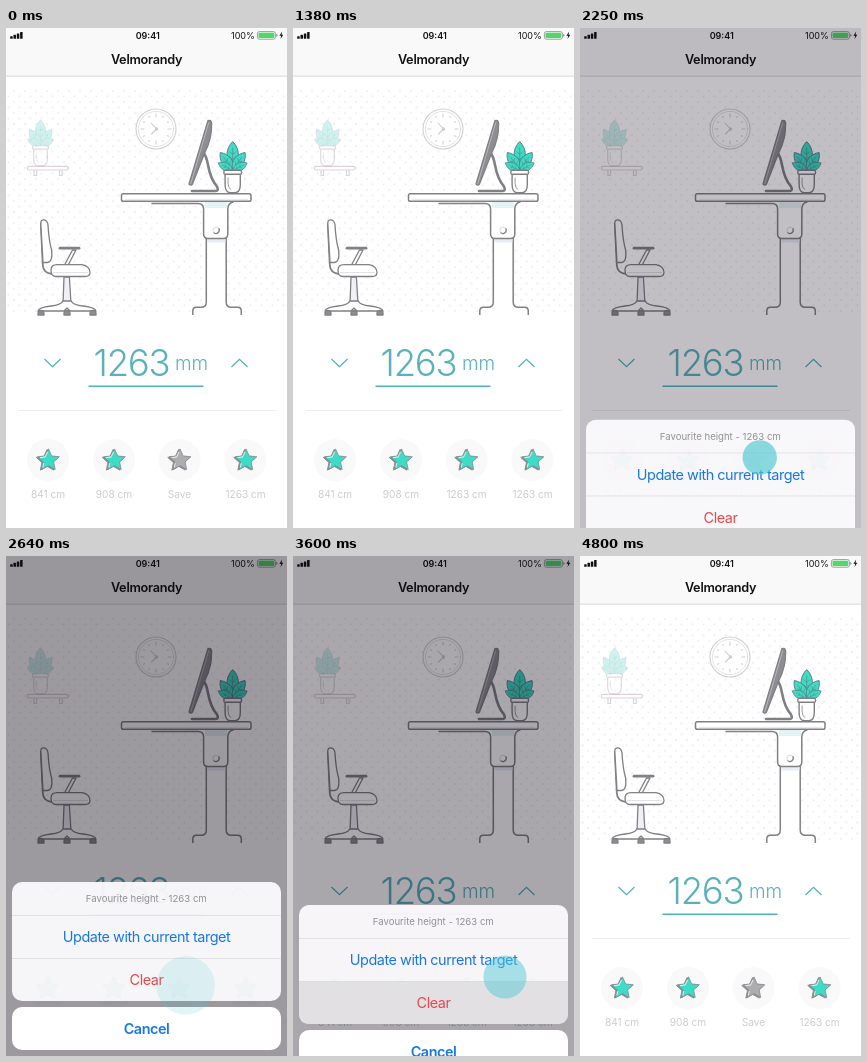
These frames come from a looping animation (281x500 px, 5220 ms). An HTML page:

```html
<!DOCTYPE html>
<html lang="en">
<head>
<meta charset="utf-8">
<title>Standing desk</title>
<style>
  html, body { margin: 0; width: 100%; height: 100%; overflow: hidden; background: #fff; }
  svg { display: block; width: 100vw; height: 100vh; }
  text { font-family: Inter, "Liberation Sans", sans-serif; }
</style>
</head>
<body>
<svg id="stage" viewBox="0 0 281 500"></svg>
<script>
const LOOP = 5220;
const INK = '#808085', TEAL = '#3cdcc6', BLUE = '#1877e6';
const SLOTS = [42, 108, 173.5, 239.5];
const LABELS = ['841 cm', '908 cm', 'Save', '1263 cm'];

const path = (d, attrs = '') => `<path d="${d}" ${attrs}/>`;
const rect = (x, y, w, h, attrs = '') =>
  `<rect x="${x}" y="${y}" width="${w}" height="${h}" ${attrs}/>`;
const circle = (x, y, r, attrs = '') => `<circle cx="${x}" cy="${y}" r="${r}" ${attrs}/>`;
const text = (x, y, size, fill, str, attrs = 'text-anchor="middle"') =>
  `<text x="${x}" y="${y}" font-size="${size}" fill="${fill}" ${attrs}>${str}</text>`;
const group = (attrs, ...parts) => `<g ${attrs}>${parts.join('')}</g>`;

function statusBar() {
  const bars = [0, 1, 2, 3].map(i =>
    rect(4.2 + i * 3.3, 8.2 - i * 1.4, 2.5, 2.6 + i * 1.4, 'rx=".5" fill="#111"'));
  return rect(0, 0, 281, 48, 'fill="#f9f9f9"') + rect(0, 47.8, 281, .6, 'fill="#bdbdbd"') +
    bars.join('') +
    text(141.7, 10.8, 9, '#111', '09:41', 'text-anchor="middle" font-weight="600"') +
    text(225, 10.8, 9, '#111', '100%', '') +
    rect(251.4, 3.6, 18, 7.6, 'rx="2" fill="none" stroke="#777" stroke-width=".7"') +
    rect(252.5, 4.7, 15.8, 5.4, 'rx="1.1" fill="#4cd964"') +
    path('M270.3 6v2.8q1.2-.4 1.2-1.4t-1.2-1.4z', 'fill="#777"') +
    path('M276.2 3.6l-2.8 4.2h1.8l-.7 3.3 2.8-4.3h-1.8z', 'fill="#111"') +
    text(140.6, 35.5, 12.7, '#111', 'Velmorandy',
      'text-anchor="middle" font-weight="600" letter-spacing="-.25"');
}

function backdrop() {
  return `<defs><pattern id="dots" width="11" height="11" patternUnits="userSpaceOnUse">
    <g fill="#f3f2f4"><circle cx="2.5" cy="2.5" r="1.2"/><circle cx="8" cy="8" r="1.2"/></g>
    </pattern></defs>` + rect(0, 62, 281, 225, 'fill="url(#dots)"');
}

function leaf(angle, y, size) {
  return group(`transform="translate(0 ${y}) rotate(${angle}) scale(${size})"`,
    path('M0 0C-8-6-7-17 0-24C7-17 8-6 0 0Z', `fill="${TEAL}"`),
    path('M0 0V-18M0-6l3.4-3.4M0-6l-3.4-3.4M0-11l3-3M0-11l-3-3', 'stroke-width=".6"'));
}

function plant(x, y, size, opacity) {
  return group(`transform="translate(${x} ${y}) scale(${size})" opacity="${opacity}"
    fill="none" stroke="#5b7f84" stroke-width="1" stroke-linejoin="round"`,
    leaf(0, -27, 1), leaf(-36, -23, .88), leaf(36, -23, .88), leaf(-62, -22, .68), leaf(62, -22, .68),
    group(`stroke="${INK}" stroke-width="1.4"`,
      path('M-7.6-19V-8Q-7.6 0-2.5 0H2.5Q7.6 0 7.6-8V-19Z', 'fill="#fff"'),
      path('M-4.6-15V-9Q-4.4-4-1.5-3', 'stroke-width=".8"'),
      rect(-8.8, -22.4, 17.6, 4, 'rx="1.2" fill="#fff"')));
}

function shelf() {
  return group('fill="#fff" stroke="#ddd3dc" stroke-width="1.2"',
    path('M28 142v5.5h2.6V142M53.5 142v5.5h2.6V142'),
    rect(21.5, 138.4, 40.5, 3.6, 'rx="1.2"'));
}

function clock() {
  const ticks = Array.from({ length: 12 }, (_, i) =>
    path(i % 3 ? 'M0-14.4v1' : 'M0-15v3', `transform="rotate(${i * 30})"`));
  return group('transform="translate(150 101)" fill="none" stroke="#cfcfd1" stroke-width="1.1" stroke-linecap="round"',
    circle(0, 0, 20, 'fill="#fff"'), circle(0, 0, 17.6, 'stroke-width=".6"'),
    ...ticks, path('M-5-6L.5 0L-4.5 5'), circle(.5, 0, 1.2, 'fill="#cfcfd1"'));
}

function monitor() {
  return group(`fill="none" stroke="${INK}" stroke-width="1.3" stroke-linejoin="round" stroke-linecap="round"`,
    path('M196.5 123Q200.5 128 202 137Q204.5 151 211 158.5Q213 162.8 210 163H186', 'stroke-width="2.6"'),
    path('M202 92.5Q205 91.5 205.6 95Q206 111 199 124L186.5 156Q184.8 158.2 183 156Z', 'fill="#8d8d92"'),
    path('M202.6 95L184.8 155.5', 'stroke="#c9c9cd" stroke-width=".7"'));
}

function desk() {
  return group(`fill="#fff" stroke="${INK}" stroke-width="1.5" stroke-linejoin="round"`,
    path('M200.3 208V274Q200.3 279.3 195 279.3H190.5Q186.8 279.3 186.8 283V287H235.3V283Q235.3 279.3 231.5 279.3H225.5Q220.2 279.3 220.2 274V208', 'stroke="none"'),
    path('M200.3 208V274Q200.3 279.3 195 279.3H190.5Q186.8 279.3 186.8 283V287M220.2 208V274Q220.2 279.3 225.5 279.3H231.5Q235.3 279.3 235.3 283V287', 'fill="none"'),
    rect(201.2, 211, 18.2, 3.5, 'fill="#e9ecf5" stroke="none"'),
    path('M146 175.4H192Q197.6 175.4 197.6 181V206Q197.6 210.5 202 210.5H217.5Q221.8 210.5 221.8 206V181Q221.8 175.4 227 174', 'stroke-linecap="round"'),
    rect(199, 174, 22, 6, 'fill="#e6f3f5" stroke="none"'),
    circle(210.2, 202.5, 3.3, 'fill="none" stroke="#c9c9cc" stroke-width=".7"'),
    path('M212.8 200.4a3.4 3.4 0 0 1-5.2 4.2', 'fill="none" stroke-width="1.2"'),
    rect(115.5, 165.8, 129.5, 7.5, 'rx="1.8"'),
    path('M119 171.4H242', 'stroke="#e3e3e8" stroke-width=".9"'));
}

function chair() {
  const wheel = x => path(`M${x - 3} 287V285.5a3 3 0 0 1 6 0V287Z`, 'fill="#8d8d92"');
  return group(`fill="#fff" stroke="${INK}" stroke-width="1.3" stroke-linejoin="round"`,
    path('M34.8 195L36.8 237Q37.2 245 46 246', 'fill="none" stroke-width="1.8"'),
    path('M34.8 195Q34.8 191.6 38 191.8Q41.4 192.2 42 197Q42.8 212 45.6 222Q47 234 41.5 234.5H37Z'),
    path('M66.5 222L58.5 237H62.2L70 222Z'),
    path('M54 220.2H73', 'stroke-width="2.8" stroke-linecap="round"'),
    path('M58 249L57 276H65L63.4 249Z', 'fill="#f0f0f7"'),
    path('M45 242Q45 236.6 51 236.6H76Q83.8 238 84 244.5Q83.8 248.5 79 248.5H50Q45 248.5 45 242Z'),
    path('M47 244.6H82', 'stroke="#dcdce2" stroke-width=".9"'),
    path('M56.8 273H65.2Q67 277 77 278Q89.5 279.5 90 283H64L61 280L58 283H32Q32.5 279.5 45 278Q55 277 56.8 273Z'),
    wheel(35), wheel(61), wheel(87));
}

const starShape = Array.from({ length: 10 }, (_, i) => {
  const a = i * Math.PI / 5 - Math.PI / 2, r = i % 2 ? 5.4 : 11.4;
  return (r * Math.cos(a)).toFixed(2) + ' ' + (r * Math.sin(a)).toFixed(2);
}).join('L');

function star(x, fill, id = '') {
  return group(`${id} transform="translate(${x} 432.3)" stroke-linejoin="round"`,
    path(`M${starShape}Z`, 'transform="translate(-.9 .6)" fill="#8c8c92" stroke="#8c8c92" stroke-width="1"'),
    path(`M${starShape}Z`, `transform="translate(.5 0)" fill="${fill}" stroke="#85888d" stroke-width=".8"`),
    path('M-8-2.5L-3-3.4L-.4-8.5M-5.2 7L-4.3 2.8', 'fill="none" stroke="#fff" stroke-opacity=".75" stroke-width="1.1"'));
}

function controls() {
  const slots = SLOTS.map((x, i) => circle(x, 432, 21, 'fill="#f9f9f9"') +
    (i === 2 ? star(x, '#adadb0', 'id="grey"') + star(x, TEAL, 'id="saved"') : star(x, TEAL)) +
    text(x, 469.5, 10.1, '#cdcdd0', LABELS[i], `text-anchor="middle" ${i === 2 ? 'id="label"' : ''}`));
  return group('fill="none" stroke="#4db3bd" stroke-width="1.3"',
      path('M38.5 331L46.5 338.6L54.5 331M225.5 339L233.5 331.4L241.5 339'),
      path('M82.5 358.2H197.5', 'stroke-width="1.5"')) +
    text(87.5, 348, 36.5, '#5ab1bd', '1263', 'font-weight="300" letter-spacing="-1.2"') +
    text(169, 342.3, 19, '#5ab1bd', 'mm', 'font-weight="300"') +
    rect(12, 382, 258, .8, 'fill="#e9e9ea"') + slots.join('');
}

function sheet() {
  const option = (y, fill, str, weight = 400) => text(140.5, y, 14.4, fill, str,
    `text-anchor="middle" letter-spacing="-.45" font-weight="${weight}"`);
  return group('id="sheet"',
    rect(6, 326, 269, 119, 'rx="10" fill="#fbfafc" fill-opacity=".95"'),
    path('M6 402.5H275V435a10 10 0 0 1-10 10H16a10 10 0 0 1-10-10Z', 'id="pressed" fill="#dfdde0" fill-opacity=".85"'),
    rect(6, 359, 269, .6, 'fill="#d4d4d7"'), rect(6, 402, 269, .6, 'fill="#d4d4d7"'),
    text(140.3, 346.3, 9.6, '#919195', 'Favourite height - 1263 cm'),
    option(386, BLUE, 'Update with current target'),
    option(429.3, '#e8474b', 'Clear'),
    rect(6, 451, 269, 43, 'rx="10" fill="#fff"'),
    option(478, BLUE, 'Cancel', 600));
}

document.getElementById('stage').innerHTML =
  rect(0, 0, 281, 500, 'fill="#fff"') + backdrop() + statusBar() + shelf() +
  plant(34.5, 137.8, .9, .26) + clock() + monitor() + plant(226.7, 164.6, 1, 1) +
  desk() + chair() + controls() +
  rect(0, 0, 281, 500, 'id="dim" fill="#080010"') + sheet() +
  circle(0, 0, 17, 'id="touch" fill="#4fc9d1"');

const [grey, saved, label, dim, panel, pressed, touch] =
  ['grey', 'saved', 'label', 'dim', 'sheet', 'pressed', 'touch'].map(id => document.getElementById(id));
const set = (el, attrs) => Object.entries(attrs).forEach(([k, v]) => el.setAttribute(k, v));
const show = (el, on) => set(el, { visibility: on ? 'visible' : 'hidden' });
const span = (t, from, length) => Math.min(1, Math.max(0, (t - from) / length));
const smooth = p => p * p * (3 - 2 * p);
const easeOut = p => 1 - (1 - p) ** 2;

const TAPS = [
  { x: 176, y: 431, down: 60, up: 520 },
  { x: 179.7, y: 429.5, down: 1620, up: 2450 },
  { x: 212, y: 421, down: 3250, up: 3545 }
];
const FADE = 380;

function drawTouch(t) {
  const tap = TAPS.find(k => t >= k.down && t < k.up + FADE);
  show(touch, tap);
  if (!tap) return;
  const enter = easeOut(span(t, tap.down, 130));
  const leave = easeOut(span(t, tap.up, FADE));
  set(touch, { cx: tap.x, cy: tap.y, r: 10 + 7.2 * enter + 16 * leave, opacity: .66 * enter * (1 - leave) });
}

function draw(t) {
  const isSaved = t >= 520 && t < 4110;
  show(saved, isSaved);
  show(grey, !isSaved);
  label.textContent = isSaved ? '1263 cm' : 'Save';

  const open = smooth(span(t, 2018, 400)) * (1 - smooth(span(t, 3545, 245)));
  set(dim, { opacity: .4 * open });
  set(panel, { transform: `translate(0 ${174 * (1 - open)})` });
  show(panel, open > 0);
  show(pressed, open > 0 && t >= 3290);
  drawTouch(t);
}

function tick() {
  draw(performance.now() % LOOP);
  requestAnimationFrame(tick);
}
tick();
</script>
</body>
</html>
```
